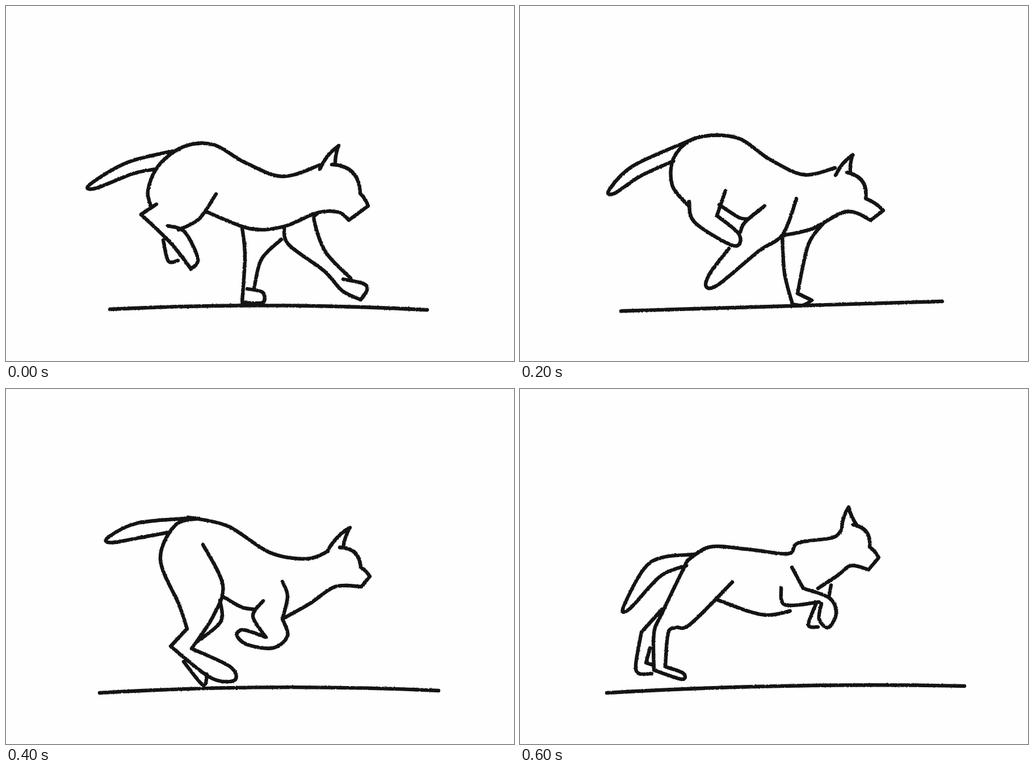
An HTML page that plays this animation: 895 px wide and 625 px high, repeating every 700 ms.

```html
<!DOCTYPE html>
<html lang="en">
<head>
<meta charset="utf-8">
<title>Running cat</title>
<style>
  html, body { margin: 0; width: 100%; height: 100%; overflow: hidden; background: #fefefe; }
  svg { display: block; width: 895px; height: 625px; }
  path { fill: none; stroke: #141414; stroke-width: 6.4; stroke-linecap: round; stroke-linejoin: round; }
</style>
</head>
<body>
<svg viewBox="0 0 895 625">
  <filter id="rough" filterUnits="userSpaceOnUse" x="0" y="0" width="895" height="625" color-interpolation-filters="sRGB">
    <feTurbulence type="fractalNoise" baseFrequency=".35" numOctaves="2" seed="4"/>
    <feDisplacementMap in="SourceGraphic" scale="2.5" xChannelSelector="R" yChannelSelector="G"/>
  </filter>
  <path filter="url(#rough)"/>
</svg>
<script>
const STEP = 100;

const points = text => text.trim().split(" ").map(p => p.split(",").map(Number));

// Unit vector from a to b
function direction(a, b) {
  const dx = b[0] - a[0], dy = b[1] - a[1], length = Math.hypot(dx, dy);
  return [dx / length, dy / length];
}

// Catmull-Rom spline
function spline(pts) {
  const at = i => pts[Math.max(0, Math.min(pts.length - 1, i))];
  const handle = (i, k) => at(i).map((v, c) => v + k * (at(i + 1)[c] - at(i - 1)[c]) / 6);
  return pts.slice(1).map((p, i) => `C${handle(i, 1)} ${handle(i + 1, -1)} ${p}`).join("");
}

// Smooth stroke; "|" makes the point before it a corner
function line(text) {
  const parts = text.split("|").map(points);
  return "M" + parts[0][0] + parts.map((p, i) => spline(i ? [parts[i - 1].at(-1), ...p] : p)).join("");
}

// Arc from a to b that rises by the share k of its length
function bow(a, b, k) {
  const mid = [(a[0] + b[0]) / 2, (a[1] + b[1]) / 2];
  return `M${a}Q${mid[0] + 2 * k * (b[1] - a[1])} ${mid[1] - 2 * k * (b[0] - a[0])} ${b}`;
}

function ground(ends, rise) {
  return bow(...points(ends), rise);
}

// Upper edge through root, bend and tip, back along a lower edge to the base
function tail(keys, width) {
  const [root, bend, tip, base] = points(keys);
  const [dx, dy] = direction(root, tip);
  const shift = ([x, y], across, back) => [x + across * dy - back * dx, y - across * dx - back * dy];
  return "M" + root + spline([root, bend, tip, shift(tip, 10, 6), shift(bend, width, 0), base]);
}

function head(keys) {
  const [earBase, earTip, brow, eye, nose, chin] = points(keys);
  return bow(earBase, earTip, .07) + bow(earTip, [brow[0] + 6, brow[1]], -.05) +
    bow(brow, eye, .23) + bow(eye, nose, .06) + "L" + chin;
}

const poses = [
  [
    ground("183,534 742,535", .013),
    tail("305,253 215,275 148,314 265,287", 22),
    head("553,287 586,246 574,279 624,330 638,352 604,377"),
    line("256,354 250,325 268,282 312,248 365,244 420,275 487,300 553,280"),
    line("604,377 | 586,363 548,364 490,388 430,392 355,363"),
    line("370,331 340,375 304,394"),
    line("265,349 238,367 | 290,417 326,463 | 338,445 315,398 285,387"),
    line("277,412 286,449 303,448"),
    line("416,390 421,440 416,522 | 452,522 452,504 425,498"),
    line("437,498 450,446 485,411"),
    line("490,388 498,420 560,466 592,501 625,517 | 636,500 630,489 594,481"),
    line("548,366 543,378 563,433 607,479")
  ],
  [
    ground("183,533 745,530", -.008),
    tail("290,241 210,273 166,313 257,284", 22),
    head("558,281 592,246 580,284 611,330 628,355 605,378"),
    line("264,347 256,300 272,255 320,234 380,242 425,275 445,279 487,298 558,282"),
    line("605,378 | 567,358 488,390"),
    line("272,348 257,360 | 320,400 362,418 365,390 331,366 | 356,315 349,273"),
    line("357,346 348,370"),
    line("327,404 354,445 370,425 367,415"),
    line("356,351 388,378 421,389"),
    line("456,372 415,391 387,462 375,525 380,533 | 415,533 429,515 418,490 465,430 492,360 489,323"),
    line("482,397 505,445 553,503 556,529 | 575,531 593,517 | 570,495 552,440 536,398 | 548,367")
  ],
  [
    ground("178,537 744,520", 0),
    tail("308,233 200,281 157,324 270,273", 22),
    head("556,298 586,262 576,293 609,339 640,360 618,377"),
    line("297,352 268,315 272,265 312,232 382,232 440,270 500,297 555,285"),
    line("618,377 | 575,362 515,392 463,404"),
    line("298,344 308,381 376,422 386,402 347,369 | 362,325"),
    line("351,350 385,372 400,375"),
    line("431,352 397,380 388,398"),
    line("368,427 335,470 328,494 350,490 420,432 463,402 487,339"),
    line("462,404 466,470 480,525 | 498,527 514,518 | 489,506 | 508,420 536,381")
  ],
  [
    ground("174,538 760,528", 0),
    tail("293,230 215,246 139,296 265,269", 38),
    head("559,304 585,252 582,297 616,335 628,348 612,369"),
    line("346,407 285,345 263,285 293,230 345,215 405,241 487,297 557,304"),
    line("612,369 | 572,360 525,382 485,405 429,405"),
    line("481,332 464,366"),
    line("342,334 395,420 417,412 411,375 416,353"),
    line("359,336 375,361 410,384"),
    line("340,400 370,450 408,500 419,478 398,465"),
    line("403,462 396,424"),
    line("342,411 328,414 | 338,435 362,443"),
    line("400,450 432,448 453,405"),
    line("432,450 432,515 460,530 470,512 446,502"),
    line("457,504 465,450 490,403")
  ],
  [
    ground("165,535 762,531", .013),
    tail("333,227 232,236 179,262 289,252", 26),
    head("567,284 606,244 588,279 625,314 641,330 626,348"),
    line("320,226 390,241 465,288 530,299 567,286"),
    line("626,348 | 580,348 535,378 490,403"),
    line("340,228 298,240 272,300 305,380 319,422 | 290,453 | 360,508 402,513 395,489 327,457 | 365,400 382,345 347,274"),
    line("377,372 378,410 335,446"),
    line("313,480 347,521 354,502"),
    line("383,366 415,384 439,388"),
    line("453,373 435,400 458,437 | 418,424 407,434 425,450 470,456 496,435 487,405 | 496,365 487,339")
  ],
  [
    ground("167,537 783,527", .019),
    tail("303,284 220,295 176,348 277,306", 27),
    head("560,262 594,210 584,240 621,280 635,290 620,315"),
    line("303,284 350,275 440,295 500,288 560,258"),
    line("620,315 | 583,307 540,350 505,360"),
    line("303,284 263,325 284,386 | 259,436 | 299,515 | 343,518 344,501 322,500 | 320,460 | 375,420 385,365 372,318"),
    line("395,393 375,433 340,465 | 343,482 373,483 374,507 352,511"),
    line("384,390 425,399 460,391"),
    line("476,361 460,382 495,431 | 462,440 460,461 515,452 517,400 501,375 | 507,360 502,336"),
    line("528,362 537,398 520,431")
  ],
  [
    ground("153,535 783,523", .01),
    tail("308,291 230,305 183,382 293,311", 30),
    head("567,245 579,208 587,239 616,278 632,297 614,318"),
    line("295,302 335,278 400,282 472,290 490,271 550,262 565,250"),
    line("614,318 | 583,311 560,328 525,351"),
    line("295,302 250,395 236,430 236,495 | 285,511 287,500 256,489 | 261,430 275,420 300,414 374,340"),
    line("250,388 214,428 | 204,485 210,501 232,501"),
    line("229,456 222,482 | 234,486"),
    line("345,370 405,392 440,398 476,391"),
    line("460,350 467,380 527,375"),
    line("479,314 499,351 | 545,368 557,395 543,420 527,405 531,378"),
    line("522,377 508,415 525,419"),
    line("548,345 544,367")
  ]
].map(strokes => strokes.join(""));

const drawing = document.querySelector("path");
const start = performance.now();

function tick() {
  const elapsed = Math.max(0, performance.now() - start);
  drawing.setAttribute("d", poses[Math.floor(elapsed / STEP) % poses.length]);
  requestAnimationFrame(tick);
}
tick();
</script>
</body>
</html>
```
